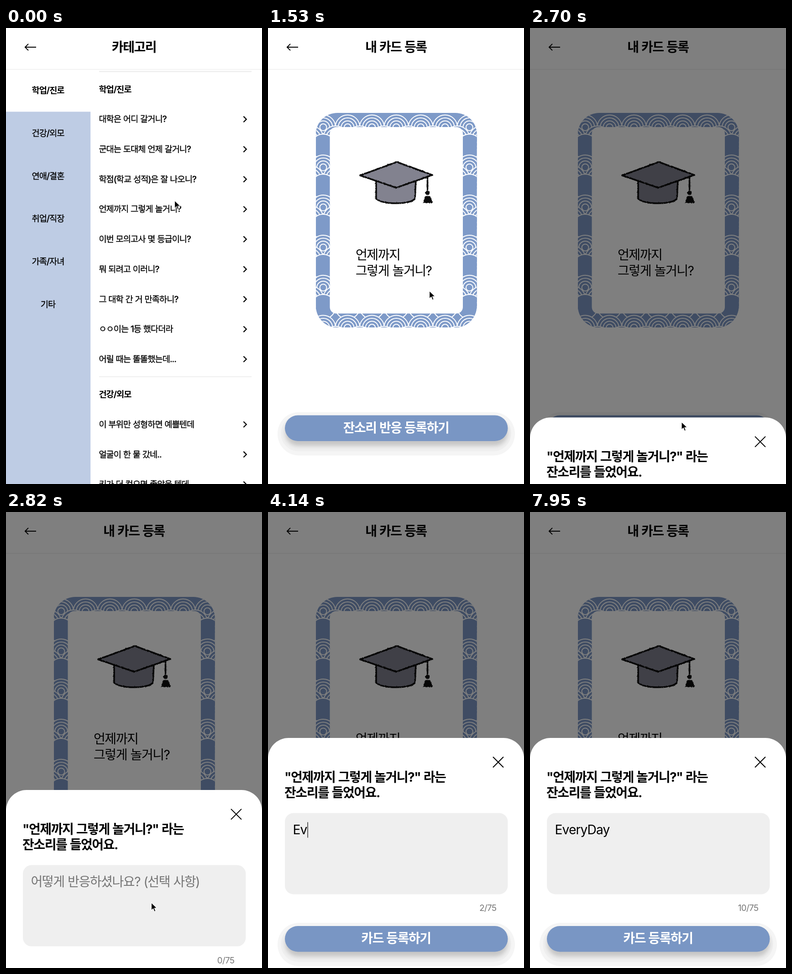
Recreate the animation shown at these times as an HTML page. Size 561x999 px, loop 8 s.

```html
<!DOCTYPE html>
<html lang="ko">
<head>
<meta charset="utf-8">
<title>카드 등록</title>
<style>
  html, body { margin: 0; width: 100%; height: 100%; overflow: hidden; background: #fff; }
  svg { display: block; width: 100vw; height: 100vh; }
  text { font-family: Inter, "Noto Sans CJK KR", "Noto Sans CJK", sans-serif; letter-spacing: -.052em; word-spacing: .04em; }
  text[font-weight="500"] { stroke: #000; stroke-width: .3px; }
  .latin { letter-spacing: -.03em; }
  .line { fill: none; stroke: #000; }
</style>
</head>
<body>
<svg id="stage" viewBox="0 0 561 999"></svg>
<script>
const LOOP = 8000, SMALL = 18.7, LARGE = 28.05;
const PAGE_SWITCH = 1020, SHEET_OPEN = 2615, SHEET_TIME = 436, SHEET_TOP = 495;
const CARD_BLUE = '#7e9ac8';

const rect = (x, y, w, h, r, fill, more = '') =>
  `<rect x="${x}" y="${y}" width="${w}" height="${h}" rx="${r}" fill="${fill}" ${more}/>`;

// y is the optical middle of the line
const text = (x, y, string, size, { weight = 400, anchor = 'start', fill = '#000', more = '' } = {}) =>
  `<text x="${x}" y="${y + size * .37}" font-size="${size}" font-weight="${weight}" text-anchor="${anchor}" fill="${fill}" ${more}>${string}</text>`;

const bold = { weight: 700 }, medium = { weight: 500 };
const centered = { weight: 700, anchor: 'middle' };

function categoryPage() {
  const tabs = ['학업/진로', '건강/외모', '연애/결혼', '취업/직장', '가족/자녀', '기타'];
  const sections = [
    [133.7, '학업/진로', ['대학은 어디 갈거니?', '군대는 도대체 언제 갈거니?', '학점(학교 성적)은 잘 나오니?',
      '언제까지 그렇게 놀거니?', '이번 모의고사 몇 등급이니?', '뭐 되려고 이러니?', '그 대학 간 거 만족하니?',
      'ㅇㅇ이는 1등 했다더라', '어릴 때는 똘똘했는데...']],
    [802.3, '건강/외모', ['이 부위만 성형하면 예쁠텐데', '얼굴이 한 물 갔네..', '키가 더 컸으면 좋았을 텐데']],
  ];
  const sidebar = tabs.map((name, i) =>
    text(92, 136 + 93.8 * i, name, SMALL, { weight: i ? 500 : 700, anchor: 'middle' })).join('');
  const list = sections.map(([top, name, rows]) =>
    text(203.4, top, name, SMALL, bold) + rows.map((row, i) => {
      const y = top + 65.7 * (i + 1);
      return text(203.4, y, row, SMALL, medium) +
        `<path class="line" stroke-width="2.2" d="M520.5 ${y - 5.8}l6.3 6.3-6.3 6.3"/>`;
    }).join('')).join('');
  return rect(0, 183.4, 185.2, 816, 0, '#becce4') + rect(204, 94, 334, 2.6, 0, '#eee') +
    rect(204, 763.2, 334, 1.5, 0, '#eaeaea') + sidebar + list + text(280.5, 42, '카테고리', LARGE, centered);
}

function waves() {
  const radius = 27, pitch = 53.4;
  const rows = [[0, 0, [radius, 20.5, 14, 7.5]], [24, .5, [radius, 20.5, 14, 7.5]], [42, 0, [radius]]];
  let out = '';
  for (let band = 0; band < 6; band++)
    for (const [drop, shift, radii] of rows)
      for (let i = -1; i < 8; i++)
        for (const r of radii)
          out += `<circle cx="${121 + pitch * (i + shift)}" cy="${190.5 + 87.8 * band + radius + drop}" r="${r}"/>`;
  return `<g clip-path="url(#card)" fill="${CARD_BLUE}" stroke="#fff" stroke-width="2">${out}</g>`;
}

function gradCap() {
  return `<g filter="url(#rough)" fill="#82828f" stroke="#0c0c0c" stroke-width="3.6" stroke-linejoin="round" stroke-linecap="round">
    <path d="M237 334L237 374Q248 384 281 384Q313 383.500 322 374L324 334Z"/>
    <path d="M202 323L282 293.500L360 322L281 350Z"/>
    <path d="M349.500 327V354" fill="none"/>
    <circle cx="349.500" cy="361" r="3" fill="#0c0c0c"/>
    <path d="M346 370H354L358.500 381.500L341.500 382Z" fill="#0c0c0c"/></g>`;
}

const button = (y, label) =>
  rect(21, y - 7, 520, 95, 47, '#f5f5f5') + rect(28, y, 505, 79, 39, '#efefef') +
  rect(38, y + 11, 487, 56, 28, '#000', 'opacity=".17" filter="url(#soft)"') +
  rect(37, y, 488.5, 56.5, 28.2, '#7996c4') +
  text(280.5, y + 27, label, LARGE, { ...centered, fill: '#fff' });

const cardPage = () =>
  text(280.5, 42, '내 카드 등록', LARGE, centered) +
  rect(105, 186, 352.5, 470, 47, CARD_BLUE) + waves() + rect(135.5, 217, 291.5, 408.5, 14, '#fff') + gradCap() +
  text(192, 497, '언제까지', LARGE) + text(192, 531.3, '그렇게 놀거니?', LARGE) +
  button(848.5, '잔소리 반응 등록하기');

const sheet = () =>
  rect(0, 0, 561, 620, 45, '#fff') +
  '<path class="line" stroke-width="2" d="M493 41.500l23 23m0-23l-23 23"/>' +
  text(36, 85.5, '"언제까지 그렇게 놀거니?" 라는', LARGE, bold) +
  text(36, 119.5, '잔소리를 들었어요.', LARGE, bold) +
  rect(37, 164.5, 488.5, 178, 19, '#efefef') +
  text(54.5, 200.5, '어떻게 반응하셨나요? (선택 사항)', LARGE, { fill: '#757575', more: 'id="placeholder"' }) +
  text(54.5, 200.5, '', LARGE, { more: 'id="typed" class="latin"' }) +
  rect(55.5, 0, 1.2, 34, 0, '#000', 'id="caret"') +
  text(500.5, 372.5, '', SMALL, { anchor: 'end', fill: '#757575', more: 'id="counter" class="latin"' }) +
  button(412, '카드 등록하기');

stage.innerHTML = `
  <defs>
    <clipPath id="card"><rect x="105" y="186" width="352.5" height="470" rx="47"/></clipPath>
    <filter id="soft" x="-10%" y="-50%" width="120%" height="200%"><feGaussianBlur stdDeviation="5"/></filter>
    <filter id="rough" color-interpolation-filters="sRGB">
      <feTurbulence type="fractalNoise" baseFrequency=".35" numOctaves="2" seed="4"/>
      <feDisplacementMap in="SourceGraphic" scale="3" xChannelSelector="R" yChannelSelector="G"/></filter>
  </defs>
  <rect width="561" height="999" fill="#fff"/>
  <rect y="89.800" width="561" height="1.500" fill="#eee"/>
  <path class="line" stroke-width="1.900" d="M66 42H42M49 34.800L41.800 42L49 49.200"/>
  <g id="categories">${categoryPage()}</g>
  <g id="cardView">${cardPage()}</g>
  <rect id="dim" width="561" height="999" opacity=".5"/>
  <g id="panel">${sheet()}</g>
  <g id="pointer">
    <path id="arrow" d="M0 0V17L4 13.300L6.700 19.700L9.500 18.500L6.900 12.200L12.300 11.900Z" stroke="#fff" stroke-width="1.200"/>
    <path id="beam" class="line" stroke-width="1.300" d="M-4-9.500Q0-9.500 0-7Q0-9.500 4-9.500M0-7V7M-4 9.500Q0 9.500 0 7Q0 9.500 4 9.500M-2 3H2"/>
  </g>`;

const el = id => document.getElementById(id);
const show = (id, on) => el(id).style.display = on ? '' : 'none';

// [time, x, y]
const pointerPath = [[0, 369.5, 378], [30, 369.5, 378], [450, 362, 391], [1350, 362, 391], [1770, 341, 857],
  [2010, 341, 857], [2340, 337, 863], [2490, 337, 863], [2700, 332, 863], [2970, 300, 846], [3270, 297, 790], [3450, 297, 775]];
const message = 'EveryDay\n\n\n';
const keyTimes = [3870, 4050, 4200, 4380, 4740, 5040, 5190, 5270, 5560, 6500, 6910];
const FOCUS = 3420, DELETE = 7890, CARET_END = 7740;

// the CSS "ease" curve
function ease(p) {
  let low = 0, high = 1;
  for (let i = 0; i < 24; i++) {
    const u = (low + high) / 2;
    if (.75 * u * (1 - u) + u ** 3 < p) low = u; else high = u;
  }
  return .3 * low * (1 - low) ** 2 + 3 * low * low * (1 - low) + low ** 3;
}

function pointerAt(t) {
  const next = pointerPath.findIndex(stop => stop[0] > t);
  if (next < 0) return pointerPath.at(-1).slice(1);
  const [t0, x0, y0] = pointerPath[next - 1], [t1, x1, y1] = pointerPath[next];
  const p = (t - t0) / (t1 - t0), s = p * p * (3 - 2 * p);
  return [x0 + (x1 - x0) * s, y0 + (y1 - y0) * s];
}

function draw(t) {
  show('categories', t < PAGE_SWITCH);
  show('cardView', t >= PAGE_SWITCH);

  const opened = t >= SHEET_OPEN;
  show('dim', opened);
  show('panel', opened);
  const rise = ease(Math.min(1, Math.max(0, (t - SHEET_OPEN) / SHEET_TIME)));
  el('panel').setAttribute('transform', `translate(0 ${999 - (999 - SHEET_TOP) * rise})`);

  const pressed = keyTimes.filter(time => time <= t);
  const count = pressed.length - (t >= DELETE ? 1 : 0);
  const value = message.slice(0, count), lines = value.split('\n');
  show('placeholder', !count);
  el('typed').textContent = lines[0];
  el('counter').textContent = `${count}/75`;

  const lastKey = pressed.at(-1) ?? FOCUS;
  show('caret', t >= FOCUS && t < CARET_END && (t - lastKey) % 1000 < 500);
  const caretX = lines.length > 1 || !count ? 0 : el('typed').getComputedTextLength();
  el('caret').setAttribute('transform', `translate(${caretX} ${184.5 + 35 * (lines.length - 1)})`);

  const [x, y] = pointerAt(t);
  const overText = t > 240 && t < PAGE_SWITCH || t > 2900;
  el('pointer').setAttribute('transform', `translate(${x} ${y})`);
  show('pointer', t < keyTimes[0]);
  show('arrow', !overText);
  show('beam', overText);
}

const start = performance.now();
function tick() {
  draw((performance.now() - start) % LOOP);
  requestAnimationFrame(tick);
}
tick();
</script>
</body>
</html>
```
